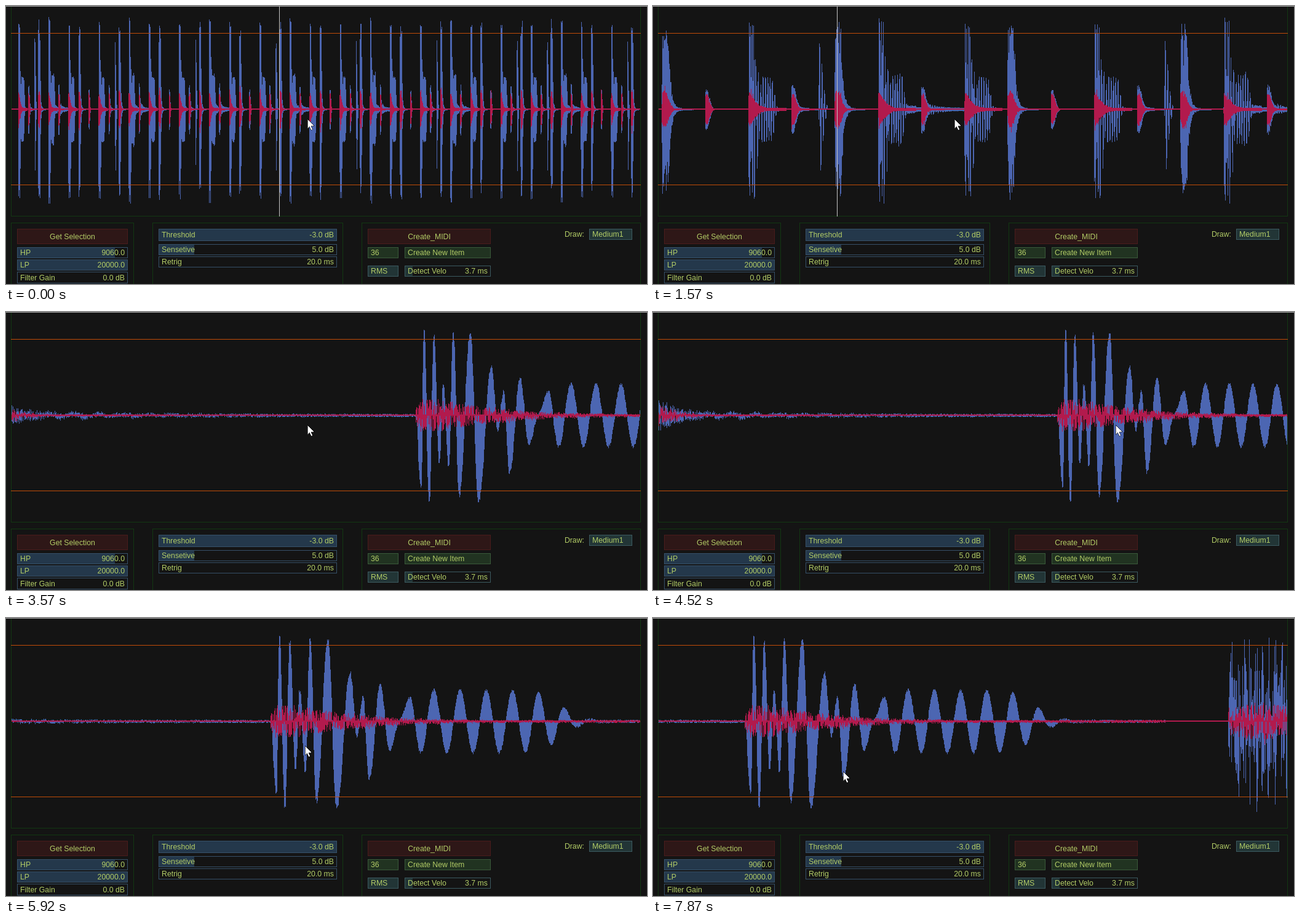
Animation, 1042 px wide and 453 px high, one loop 7.99 s. Source, as an HTML page with a canvas:

```html
<!DOCTYPE html>
<html lang="en">
<head>
<meta charset="utf-8">
<title>Drum slicer zoom</title>
<style>
  html, body { margin: 0; width: 100%; height: 100%; overflow: hidden; background: #141414; }
  canvas, svg { position: absolute; left: 0; top: 0; }
  rect, polygon { shape-rendering: crispEdges; }
  text { font: 12.3px "Liberation Sans", Arial, sans-serif; fill: #b2cc66; white-space: pre; }
</style>
</head>
<body>
<canvas id="wave" width="1042" height="453"></canvas>
<svg id="ui" width="1042" height="453" viewBox="0 0 1042 453"></svg>
<script>
const LOOP = 7990, LEFT = 9, RIGHT = 1032, MID = 168;
const RATE = 2358, STEPS = 64, PHRASE = 51, BASE = 16.335, FULL = 786;
const { exp, sin, cos, PI, min, max, round, floor } = Math;

// ---- Seeded noise ----
let seed = 20177;
function rand() {
  seed = (seed + 0x6D2B79F5) | 0;
  let t = Math.imul(seed ^ (seed >>> 15), 1 | seed);
  t = (t + Math.imul(t ^ (t >>> 7), 61 | t)) ^ t;
  return ((t ^ (t >>> 14)) >>> 0) / 4294967296;
}
const noise = () => rand() * 2 - 1;
const spike = () => noise() * (rand() < 0.012 ? 1.4 : 1);
const bell = (p, width) => exp(-((p / width) ** 2));

// ---- Sound: an eight-step drum pattern, p is the time since the hit ----
const blue = new Float32Array(RATE * STEPS);
const red = new Float32Array(RATE * STEPS);

function stamp(track, start, length, shape) {
  const first = round(start * RATE);
  const count = min(round(length * RATE), track.length - first);
  for (let i = 0; i < count; i++) track[first + i] += shape(i / RATE);
}

// Key swings of the attack; after RING it is a fading sine
const RING = 244;
const ATTACK = [
  [0, 0], [9, -117], [14, 135], [23, -138], [31, 128], [40, -78], [47, 48], [56, -79],
  [64, 132], [74, -129], [93, 132], [107, -141], [129, 78], [140, -22], [150, 38],
  [160, -93], [178, 58], [193, -45], [209, 0], [226, 38], [RING, -50]
];
function drumAt(x) {
  if (x >= RING) return 50 * cos(2 * PI * (x - 265) / 42.6) / (1 + exp((x - 472) / 16));
  const next = ATTACK.findIndex(key => key[0] > x);
  const [x0, a] = ATTACK[next - 1], [x1, b] = ATTACK[next];
  return a + (b - a) * (1 - cos(PI * (x - x0) / (x1 - x0))) / 2;
}

function lowDrum(u, ringing) {
  const gain = ringing ? 1.06 : 1;
  stamp(blue, u, 0.87, p => gain * drumAt(p * FULL) + noise() * (7 * exp(-p / 0.15) + 2.4));
  stamp(red, u, 0.87, p =>
    spike() * min(1, 0.35 + p / 0.015) * 28 * exp(-((p / 0.19) ** 1.5)) + noise() * 2);
  if (ringing) stamp(blue, u + 0.45, 1.2, p => noise() * 7.5 * exp(-p / 0.6));
}

function snare(u) {
  const body = p => 140 * exp(-max(0, p - 0.14) / 0.055);
  stamp(blue, u, 0.82, p =>
    body(p) * noise() * (0.45 + 0.58 * sin(p * FULL * 0.31) ** 2) + noise() * 9 * exp(-p / 0.25));
  stamp(red, u, 0.6, p => spike() * 30 * bell(p - 0.06, 0.12) + noise() * 4 * exp(-p / 0.2));
}

function hat(u, open, wobble) {
  stamp(blue, u, open ? 1 : 0.2, p =>
    noise() * (33 * bell(p - 0.03, 0.09) + (open ? 8 * exp(-p / 0.25) : 0)));
  stamp(red, u, open ? 0.6 : 0.2, p =>
    spike() * 25 * bell(p - 0.03, 0.09) + noise() * (open ? 3 * exp(-p / 0.3) : 0));
  if (wobble) {
    stamp(blue, u + 0.17, 0.83, p =>
      6 * cos(2 * PI * (p - 0.14) / 0.0534) * exp(-p / 0.15) * min(1, p / 0.1) + noise() * 2.4);
  }
}

function click(u) {
  stamp(blue, u, 0.2, p => bell(p, 0.11) * (95 * sin(p * FULL * 0.14) + 22 * noise()));
}

for (let u = 2; u < STEPS; u++) {
  const beat = ((u - 2) % PHRASE + 2) % 8;
  if (beat % 4 === 0) snare(u);
  else if (beat === 2 || beat === 5 || beat === 7) lowDrum(u, beat === 5);
  else hat(u, beat !== 1, beat === 6);
  if (beat === 3) click(u + 0.63);
}

// ---- View: origin is the x of step 31 ----
const views = [{ time: 0, scale: BASE, origin: 490 + 0.235 * BASE }];
function zoom(time, factor, x = 490) {
  const last = views.at(-1);
  const scale = min(FULL, last.scale * factor);
  views.push({ time, scale, origin: x + (last.origin - x) * scale / last.scale });
}
// A flick of the wheel: one notch, then several per tick
function flick(start, ticks, gap, speed) {
  for (let i = 0; i < ticks; i++) zoom(start + i * gap, 1.2 ** (i ? speed : 1));
}
flick(560, 4, 120, 2);
flick(1570, 3, 150, 3.5);
flick(2550, 4, 120, 2);
zoom(3570, 1 / 1.05);
zoom(3720, 1 / 1.05);
zoom(5250, 1.05, 762);
zoom(5370, 1.05, 728);

// ---- Pointer tip ----
const pointer = [{ time: 0, x: 490, y: 184 }];
const move = (time, x, y) => pointer.push({ time, x, y });
const easeOut = (from, to, q, power) => to + (from - to) * (1 - q) ** power;
function glide(start, end, count, x, y, powerX = 1, powerY = 1, onStep) {
  const from = pointer.at(-1);
  for (let i = 0; i < count; i++) {
    const time = start + (end - start) * i / (count - 1), q = (i + 1) / count;
    move(time, round(easeOut(from.x, x, q, powerX)), round(easeOut(from.y, y, q, powerY)));
    onStep?.(time, q);
  }
}
move(4250, 502, 183);
move(4400, 620, 176);
move(4520, 752, 184);
glide(4670, 4830, 2, 766, 184);
move(5100, 762, 184);
move(5370, 728, 185);
const grabbed = views.at(-1).origin;
glide(5520, 6940, 12, 228, 218, 1.63, 3, (time, q) =>
  views.push({ time, scale: FULL, origin: easeOut(grabbed, 149.5, q, 1.42) }));
glide(7100, 7240, 2, 160, 150);
move(7360, 180, 89);
move(7480, 210, 127);
glide(7630, 7870, 3, 309, 250);

const stepAt = (steps, t) => steps.findLast(step => step.time <= t);

// ---- Interface ----
const ui = document.getElementById("ui");
function add(tag, attrs, content = "") {
  const node = document.createElementNS("http://www.w3.org/2000/svg", tag);
  for (const name in attrs) node.setAttribute(name, attrs[name]);
  node.textContent = content;
  return ui.appendChild(node);
}
const fill = (x, y, width, height, color) => add("rect", { x, y, width, height, fill: color });
const frame = (x, y, w, h, stroke, inside = "none") =>
  add("rect", { x: x + 0.5, y: y + 0.5, width: w - 1, height: h - 1, stroke, fill: inside });
const label = (x, y, content, anchor = "start") =>
  add("text", { x, y, "text-anchor": anchor }, content);

const PANEL = "#123812", LINE = "#c04c08";
const RED = ["#4a1c1c", "#2e1717"], GREEN = ["#3a5a3a", "#213321"];
const TEAL = ["#3c5a60", "#223536"], BLUE = ["#365068", "#24384b"];

function button(x, y, w, h, [edge, inside], content, centered) {
  frame(x, y, w, h, edge, inside);
  label(centered ? x + w / 2 : x + 5, y + (centered ? 17 : 13), content, centered ? "middle" : "start");
}
function slider(x, y, w, h, level, name, value, [edge, inside] = BLUE) {
  const baseline = y + (h > 18 ? 14 : 13);
  fill(x, y, level * w, h, inside);
  frame(x, y, w, h, edge);
  label(x + 5, baseline, name);
  label(x + w - 5, baseline, value, "end");
}

frame(8, 0, 1024, 343, PANEL);
for (const [x, w] of [[8, 200], [238, 310], [578, 454]]) frame(x, 353, w, 120, PANEL);
fill(0, 0, 1042, 1, "#a4a4a4");
for (const y of [44, 291]) fill(8, y, 1024, 1, LINE);

button(18, 363, 180, 25, RED, "Get Selection", true);
slider(18, 393, 180, 18, 0.885, "HP", "9060.0");
slider(18, 413, 180, 18, 1, "LP", "20000.0");
slider(18, 433, 180, 19, 0, "Filter Gain", "0.0 dB");
slider(248, 363, 290, 20, 1, "Threshold", "-3.0 dB");
slider(248, 388, 290, 18, 0.2, "Sensetive", "5.0 dB");
slider(248, 408, 290, 18, 0, "Retrig", "20.0 ms");
button(588, 363, 200, 25, RED, "Create_MIDI", true);
button(588, 393, 50, 18, GREEN, "36");
button(648, 393, 140, 18, GREEN, "Create New Item");
button(588, 423, 50, 18, TEAL, "RMS");
slider(648, 423, 140, 18, 0.09, "Detect Velo", "3.7 ms", TEAL);
label(940, 376, "Draw:", "end");
button(948, 363, 70, 18, TEAL, "Medium1");

const playhead = fill(0, 1, 1, 342, "#c4c4c4");
const arrow = add("polygon", {
  points: "0,0 0,16 3.6,12.6 6,18.4 8.4,17.4 6,11.8 11,11.4",
  fill: "#fff", stroke: "#000", "stroke-width": 0.6
});

// ---- Drawing ----
const ctx = document.getElementById("wave").getContext("2d");
function drawTrack(track, color, { scale, origin }) {
  const sampleAt = x => floor((31 + (x - origin) / scale) * RATE);
  ctx.fillStyle = color;
  for (let x = LEFT; x < RIGHT; x++) {
    const end = max(sampleAt(x + 1), sampleAt(x) + 1);
    let high = 1, low = 0;
    for (let i = sampleAt(x); i < end; i++) {
      high = max(high, track[i] || 0);
      low = min(low, track[i] || 0);
    }
    const top = MID - round(high);
    ctx.fillRect(x, top, 1, MID - round(low) + 1 - top);
  }
}

let shown;
function drawView(view) {
  if (view === shown) return;
  shown = view;
  ctx.clearRect(0, 0, 1042, 453);
  drawTrack(blue, "#4c66b2", view);
  drawTrack(red, "#b21a4d", view);
  const x = floor(view.origin - 2.929 * view.scale - 1.5);
  playhead.setAttribute("x", x);
  playhead.setAttribute("visibility", x < LEFT ? "hidden" : "visible");
}

const start = performance.now();
function tick() {
  const t = (performance.now() - start) % LOOP;
  drawView(stepAt(views, t));
  const { x, y } = stepAt(pointer, t);
  arrow.setAttribute("transform", `translate(${x} ${y})`);
  requestAnimationFrame(tick);
}
tick();
</script>
</body>
</html>
```
